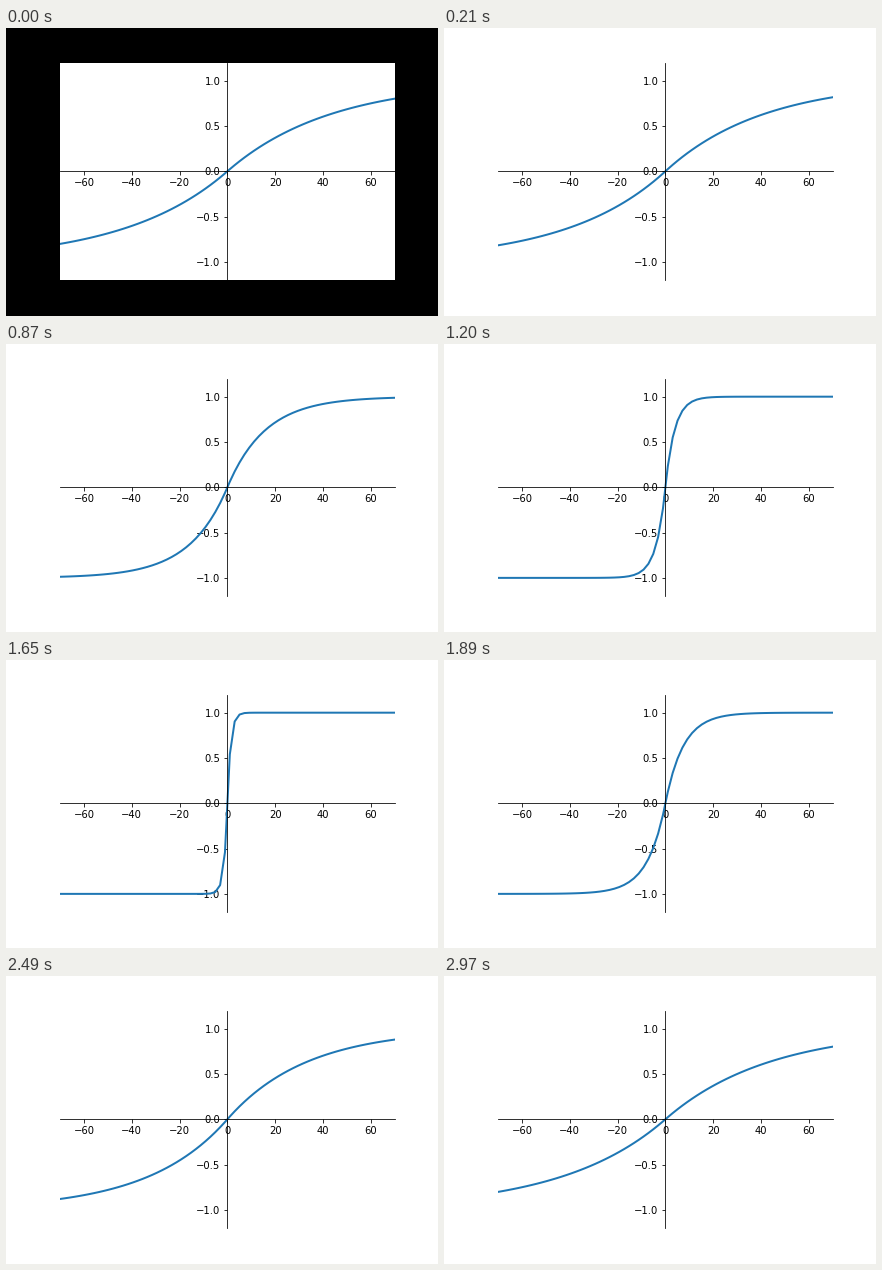
These frames come from a looping animation (432 by 288 pixels, 3000 ms). A matplotlib script:

```python
import numpy as np
import matplotlib.pyplot as plt
from matplotlib.animation import FuncAnimation
from matplotlib.patches import Rectangle

FRAMES = 100
LIMIT = 70

fig = plt.figure(figsize=(6, 4), dpi=72, facecolor="white")
ax = fig.add_axes([0.125, 0.125, 0.775, 0.755])
ax.set(xlim=(-LIMIT, LIMIT), ylim=(-1.2, 1.2),
       xticks=np.arange(-60, 61, 20), yticks=np.arange(-1, 1.1, 0.5))
for side in ("left", "bottom"):
    ax.spines[side].set_position("zero")
for side in ("right", "top"):
    ax.spines[side].set_visible(False)

# Black surround that flashes once at the start of each loop
surround = fig.add_artist(Rectangle((0, 0), 1, 1, transform=fig.transFigure,
                                    color="black", lw=0, zorder=-1))

x = np.linspace(-LIMIT, LIMIT, 70)
line, = ax.plot(x, np.zeros_like(x), color="#1f77b4", lw=2)


def saturation(x, half):
    """Odd curve that reaches half its limit at x = half."""
    return np.sign(x) * (1 - 2 ** (-np.abs(x) / half))


def update(i):
    half = 15 * (1 + np.cos(2 * np.pi * i / (FRAMES - 1)))
    line.set_ydata(saturation(x, half))
    surround.set_visible(i == 0)
    return line, surround


anim = FuncAnimation(fig, update, frames=FRAMES, interval=30,
                     init_func=lambda: update(0), repeat=True, repeat_delay=0)
plt.show()
```
